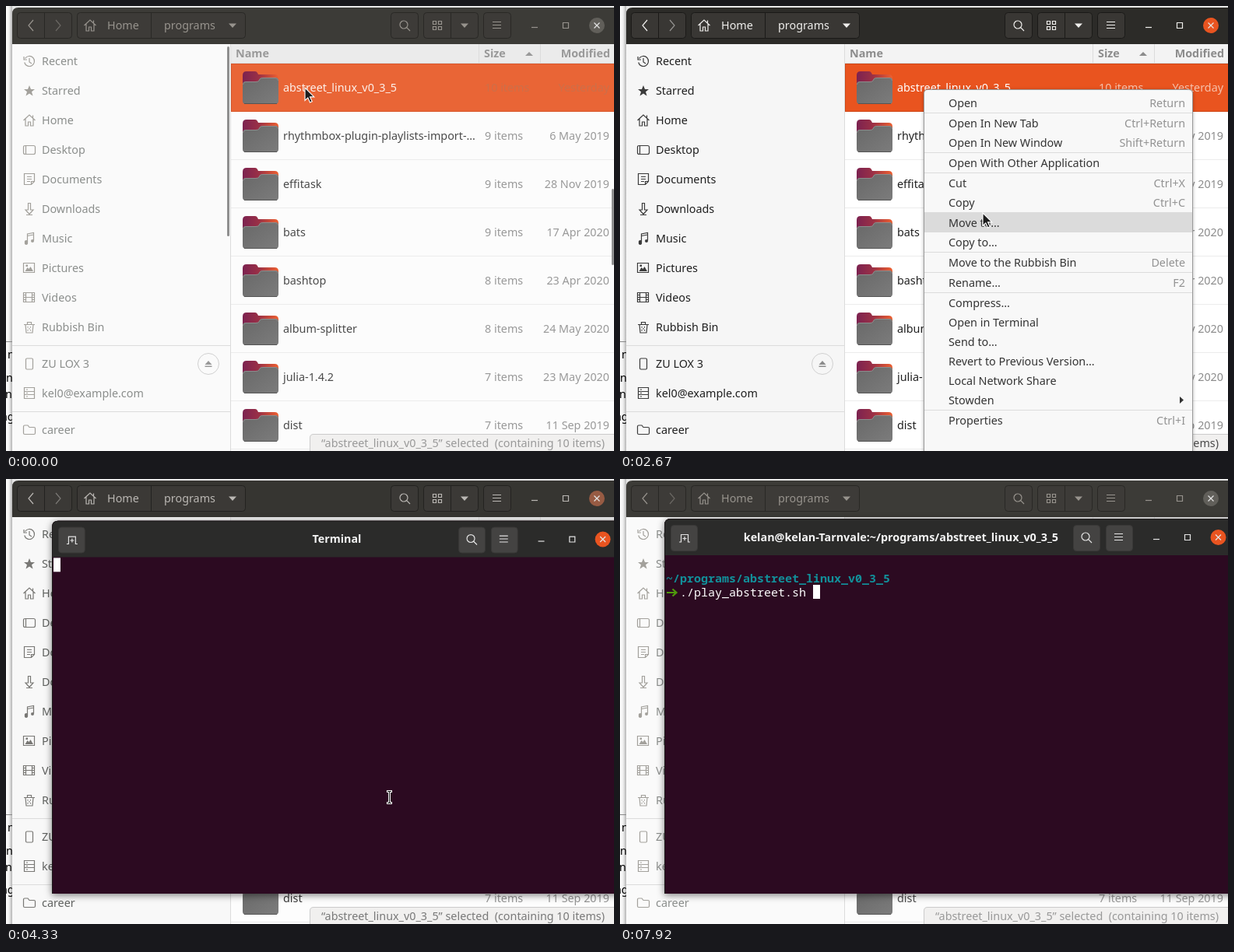
An HTML page that plays this animation: 781 px wide and 572 px high, repeating every 8000 ms.

```html
<!DOCTYPE html>
<html lang="en">
<head>
<meta charset="utf-8">
<title>Open in Terminal</title>
<style>
html, body { margin: 0; width: 781px; height: 572px; overflow: hidden; background: #fff; }
svg { display: block; }
text { font: 14.35px "Noto Sans", "Open Sans", sans-serif; white-space: pre; }
.b { font-weight: 700; }
.end { text-anchor: end; }
.mid { text-anchor: middle; }
.mono { font: 15px "Noto Sans Mono", "DejaVu Sans Mono", monospace; }
.mono.b { font-weight: 700; }
.ln { fill: none; stroke: currentColor; stroke-width: 1.2; }
.so { fill: currentColor; }
.hdr { fill: var(--hdr); }
.hbtn { fill: var(--hbtn); stroke: var(--hbord); }
.hfg { color: var(--hfg); fill: var(--hfg); }
.tfg { color: #e4e4e4; fill: #f4f4f4; }
.close { fill: var(--close); }
.side { fill: var(--side); }
.stext { fill: var(--stext); }
.sicon { color: var(--sicon); }
.list { fill: var(--list); }
.col { fill: var(--col); }
.dim { fill: var(--dim); color: var(--dim); }
.status { fill: var(--status); }
.name { fill: var(--name); }
.sel { fill: var(--sel); stroke: var(--selbord); }
.selname { fill: var(--selname); }
.selsub { fill: var(--selsub); }
.rule { stroke: #dcdcdc; }
.mtext { fill: #343434; }
.accel { fill: #929292; }
#term { transform-origin: 425px 533px; filter: drop-shadow(0 2px 5px rgba(0,0,0,.5)); }
#menu { filter: drop-shadow(0 1px 2px rgba(0,0,0,.3)); }
</style>
</head>
<body>
<svg id="stage" width="781" height="572" viewBox="0 0 781 572">
  <defs>
    <linearGradient id="edge"><stop stop-color="#fff"/><stop offset=".5" stop-color="#efefef"/><stop offset="1" stop-color="#b4b4b4"/></linearGradient>
    <linearGradient id="back"><stop stop-color="#7c2250"/><stop offset=".45" stop-color="#9a3046"/><stop offset="1" stop-color="#ee6030"/></linearGradient>
    <linearGradient id="front" x2="1" y2="1"><stop stop-color="#686868"/><stop offset="1" stop-color="#7c7c7c"/></linearGradient>
    <g id="folder">
      <path d="M0 5q0-5 5-5h11q2 0 3 2l1 2h21q5 0 5 5v20H0z" fill="url(#back)"/>
      <path d="M0 17q0-4 4-4h13q3 0 4-1.500l1-2q1-1.500 4-1.500h16q4 0 4 4v26q0 4-4 4H4q-4 0-4-4z" fill="url(#front)"/>
      <path d="M.5 17q0-3.500 3.500-3.500h13q3 0 4-1.500l1-2q1-1.500 4-1.500h16q3.500 0 3.500 3.500" stroke="#8c8c8c" fill="none"/>
      <path d="M2 41.500h42" stroke="#555" fill="none"/>
    </g>
  </defs>
  <g id="files"></g>
  <g id="menu"></g>
  <g id="term"></g>
  <path id="arrow" d="M0 0v16.500l3.800-3.600 2.700 6.100 2.700-1.200-2.700-5.900h5.300z" fill="#1c1c1c" stroke="#fff" stroke-width="1.100"/>
  <g id="beam" fill="none">
    <path d="M-3-7.500h7M.5-7.500v15M-3 7.500h7" stroke="#fff" stroke-width="3"/>
    <path d="M-2-7.500h5M.5-7.500v15M-2 7.500h5" stroke="#111"/>
  </g>
</svg>
<script>
const LOOP = 8000, STEP = 1000 / 12;
const el = id => document.getElementById(id);

const text = (x, y, s, cls = "", attrs = "") => `<text x="${x}" y="${y}" class="${cls}" ${attrs}>${s}</text>`;
const rect = (x, y, w, h, attrs = "") => `<rect x="${x}" y="${y}" width="${w}" height="${h}" ${attrs}/>`;
const line = (d, cls = "rule") => `<path d="${d}" class="${cls}" fill="none"/>`;
const at = (x, y, body, cls = "") => `<g transform="translate(${x} ${y})" class="${cls}">${body}</g>`;
const ln = d => `<path class="ln" d="${d}"/>`;
const so = d => `<path class="so" d="${d}"/>`;

// Icons are centred on the origin.
const icons = {
  recent: ln("M-5.500-3.500a6.500 6.500 0 1 1-.8 5M-7-6v4h4M0-4V1l3 2"),
  star: so("M0-7l2 5h5l-4 3.300 1.500 5.200L0 3.500l-4.500 3L-3 1.300-7-2h5z"),
  house: ln("M-7.500 0L0-7 7.500 0M-5-2v9h3.500V2h3v5H5v-9M4.500-6.500v3"),
  desktop: ln("M-5.500-5.500h11q2 0 2 2v7q0 2-2 2h-11q-2 0-2-2v-7q0-2 2-2zM-4.500-5.500v11"),
  doc: ln("M-6.500-7.500h13v10l-4 4h-9zM-3-3.500h6M-3-.5h6M-3 2.500h4M6.500 2.500h-4v4"),
  down: ln("M-1.500-7.500h3V1H5L0 6.500-5 1h3.500zM-4 7.500h8"),
  music: ln("M-2.500 4v-10l8-1.500v10M-2.500-3.500l8-1.500") + so("M-6 5a2.200 2.200 0 1 1 4 0 2.200 2.200 0 1 1-4 0M2 3a2 2 0 1 1 4 0 2 2 0 1 1-4 0"),
  picture: ln("M-7.500-6.500h14v12h-14z") + so("M-5.500 4l3-5 2 2 2-3 3.500 6zM-4.500-4.500h2.500v2.500h-2.500z"),
  film: ln("M-7.500-6.500h14v12h-14zM-4.500-6.500v12M3.500-6.500v12M-4.500-.5h8M-7.500-3.500h3M-7.500-.5h3M-7.500 2.500h3M3.500-3.500h3M3.500-.5h3M3.500 2.500h3"),
  bin: ln("M-7-3.500H7M-5-3.500l1 10.500h8l1-10.500M-2.500-3.500v-3h5v3M-2-1v1.500M1.500-1v1.500M-2 3v1.500M1.500 3v1.500M0 1v1.500"),
  phone: ln("M-3-7h6q1.500 0 1.500 1.500v11Q4.500 7 3 7h-6q-1.500 0-1.500-1.500v-11Q-4.500-7-3-7z"),
  server: ln("M-6.500-7.500h13v14h-13zM-6.500-2.500h13M-6.500 1.500h13M-4-5h2M-4-.5h2M-4 4h2"),
  folder: ln("M-7.500-4.500q0-1.500 1.500-1.500h4l2 2.500h6q1.500 0 1.500 1.500v6q0 1.500-1.500 1.500h-12q-1.500 0-1.500-1.500z"),
  search: ln("M4-1a5 5 0 1 1-10 0 5 5 0 1 1 10 0M2.700 2.700L7 7"),
  grid: ln("M-5.500-5.500h4v4h-4zM1.500-5.500h4v4h-4zM-5.500 1.500h4v4h-4zM1.500 1.500h4v4h-4z"),
  burger: ln("M-5-4.500H6M-5-.5H6M-5 3.500H6"),
  drop: so("M-5-2.500H5L0 3z"),
  min: ln("M-4 3.500h8"),
  max: ln("M-3.500-3.500h7v7h-7z"),
  close: ln("M-3.500-3.500l7 7M3.500-3.500l-7 7"),
  tab: ln("M-7 5h2.500v-9.500h9V5H7M0-2v5M-2.500.5h5")
};
const icon = (name, x, y, cls) => at(x, y, icons[name], cls);
const button = (x, y, w, attrs) => rect(x + .5, y + .5, w - 1, 33, `rx="4" ${attrs}`);

function buildFiles() {
  const places = [["recent", "Recent"], ["star", "Starred"], ["house", "Home"], ["desktop", "Desktop"],
    ["doc", "Documents"], ["down", "Downloads"], ["music", "Music"], ["picture", "Pictures"],
    ["film", "Videos"], ["bin", "Rubbish Bin"]].map(([i, s], n) => [i, s, 71 + 38 * n]);
  places.push(["phone", "ZU LOX 3", 460], ["server", "kel0@example.com", 498], ["folder", "career", 545]);
  const rows = [["abstreet_linux_v0_3_5", 10, "Yesterday"], ["rhythmbox-plugin-playlists-import-…", 9, "6 May 2019"],
    ["effitask", 9, "28 Nov 2019"], ["bats", 9, "17 Apr 2020"], ["bashtop", 8, "23 Apr 2020"],
    ["album-splitter", 8, "24 May 2020"], ["julia-1.4.2", 7, "23 May 2020"], ["dist", 7, "11 Sep 2019"]];

  let s = rect(0, 0, 781, 572, 'fill="#e6e6e6"') + rect(0, 0, 8, 572, 'fill="url(#edge)"')
    + rect(0, 431, 8, 1, 'fill="#8a8a8a"')
    + text(2, 453, "n") + text(0, 483, "n") + text(-1, 504, "no") + text(-7, 533, "ng");

  s += '<path class="hdr" d="M8 49V10q0-8 8-8h765v47z"/>';
  for (const [x, w, split] of [[14, 71, 49], [91, 217, 186], [494, 36], [536, 71, 571], [613, 36]])
    s += button(x, 8, w, 'class="hbtn"') + (split ? line(`M${split + .5} 8v34`, "hbtn") : "");
  s += at(32, 25, ln("M3-7l-6 7 6 7"), "hfg") + `<g opacity=".5">${at(67, 25, ln("M-3-7l6 7-6 7"), "hfg")}</g>`
    + icon("house", 108, 25, "hfg") + text(130, 30, "Home", "hfg") + text(203, 30, "programs", "hfg")
    + icon("drop", 291, 25, "hfg") + icon("search", 512, 25, "hfg") + icon("grid", 554, 25, "hfg")
    + icon("drop", 589, 25, "hfg") + icon("burger", 630, 25, "hfg") + icon("min", 679, 24, "hfg")
    + icon("max", 719, 25, "hfg") + '<circle cx="759" cy="25" r="10" class="close"/>'
    + icon("close", 759, 25, "tfg");

  s += rect(8, 49, 281, 523, 'class="side"') + line("M288.500 49v523M8 436.500h280M8 521.500h280");
  for (const [i, label, y] of places) s += icon(i, 30, y, "sicon") + text(46, y + 5, label, "stext");
  s += at(260, 460, '<circle r="13.500" fill="none" stroke="#d0d0d0"/>' + so("M-4.500 1L0-4 4.500 1zM-4.500 2.500h9v1.500h-9z"), "dim");

  s += rect(289, 49, 492, 523, 'class="list"') + rect(289, 49, 492, 24, 'class="col"')
    + line("M289 73.500h492M607.500 49v24M686.500 49v24")
    + text(295, 66, "Name", "b dim") + text(614, 66, "Size", "b dim") + text(776, 66, "Modified", "b dim end")
    + '<path class="dim" d="M667 64h10l-5-5z"/>' + rect(289.5, 74.5, 493, 61, 'class="sel"');
  rows.forEach(([name, count, date], n) => {
    const y = 110 + 62 * n, sub = n ? "dim" : "selsub";
    s += `<use href="#folder" x="304" y="${84 + 62 * n}"/>` + text(356, y, name, n ? "name" : "selname")
      + text(615, y, count + " items", sub) + text(775, y, date, sub + " end");
    if (n) s += `<path d="M289 ${135.5 + 62 * n}h492" stroke="#ececec"/>`;
  });
  s += `<path d="M390.500 573v-18q0-4.500 4.500-4.500h387v23z" fill="#f1f0ef" stroke="#cbcbcb"/>`
    + text(769, 567, "“abstreet_linux_v0_3_5” selected  (containing 10 items)", "status end")
    + `<g id="bars" fill="#8f8f8f">${rect(284, 52, 3, 244, 'rx="1.500"')}${rect(778, 235, 3, 98, 'rx="1.500"')}</g>`;
  el("files").innerHTML = s;
}

const itemTops = [];
function buildMenu() {
  const groups = ["Open|Return", "Open In New Tab|Ctrl+Return,Open In New Window|Shift+Return",
    "Open With Other Application", "Cut|Ctrl+X,Copy|Ctrl+C", "Move to…,Copy to…",
    "Move to the Rubbish Bin|Delete", "Rename…|F2",
    "Compress…,Open in Terminal,Send to…,Revert to Previous Version…,Local Network Share,Stowden",
    "Properties|Ctrl+I"];
  let y = 112, labels = "";
  groups.forEach((group, g) => {
    if (g) labels += line(`M391 ${y++ + .5}h344`);
    for (const item of group.split(",")) {
      const [label, key = ""] = item.split("|");
      itemTops.push(y);
      labels += text(422, y + 18, label, "mtext") + text(726, y + 18, key, "accel end");
      if (label === "Stowden") labels += `<path d="M719 ${y + 8}v9l5-4.500z" fill="#333"/>`;
      y += 25;
    }
  });
  el("menu").innerHTML = '<path d="M390.500 580V112.500q0-5 5-5h335q5 0 5 5V580z" fill="#f8f8f8" stroke="#9a9a9a"/>'
    + rect(391, 112, 344, 25, 'id="hover" fill="#dbdbdb"') + labels;
}

function buildTerminal() {
  const btn = x => button(x, 59, 35, 'fill="#444342" stroke="#3a3938"');
  el("term").innerHTML = '<path d="M57 533V59q0-8 8-8h728v482z" fill="#2c0a21"/>'
    + '<path d="M57 98V59q0-8 8-8h728v47z" fill="#2b2b2a"/><path d="M57.500 533V59q0-7.500 7.500-7.500h728" fill="none" stroke="#1d1a1b"/>'
    + btn(65) + btn(582) + btn(624) + icon("tab", 83, 76, "tfg") + icon("search", 599, 75, "tfg")
    + icon("burger", 640, 75, "tfg") + icon("min", 689, 74, "tfg") + icon("max", 729, 75, "tfg")
    + '<circle cx="768.500" cy="75" r="10" fill="#e95420"/>' + icon("close", 768.5, 75, "tfg")
    + text(425, 80, "Terminal", "b mid tfg", 'id="short"')
    + text(563, 80, "kelan@kelan-Tarnvale:~/programs/abstreet_linux_v0_3_5", "b end tfg", 'id="long"')
    + `<g id="prompt">${text(59, 133, "~/programs/abstreet_linux_v0_3_5", "mono b", 'fill="#12909a"')}`
    + '<path d="M60 146h11M67.500 141.500l5 4.500-5 4.500" fill="none" stroke="#4f9a0c" stroke-width="2.200"/></g>'
    + text(77, 151, "", "mono", 'id="typed" fill="#fff"')
    + rect(77, 136, 9, 18, 'id="caret" fill="#fff"');
}

// Colours for the unfocused and the focused file window.
const theme = {
  hdr: ["#3c3b37", "#2c2b28"], hbtn: ["#3d3b38", "#393734"], hbord: ["#292825", "#1b1a18"],
  hfg: ["#97938d", "#efeeec"], close: ["#615f5a", "#e95420"], side: ["#fafafa", "#f6f6f6"],
  stext: ["#8b8e8c", "#1f1f1f"], sicon: ["#a3a19c", "#3b3b3b"], list: ["#fcfcfc", "#ffffff"],
  col: ["#ebebeb", "#f3f3f3"], dim: ["#999999", "#8c8c8c"], name: ["#4a4a4a", "#202020"],
  status: ["#999999", "#4a4a4a"], sel: ["#e96536", "#e9541f"], selbord: ["#d9572a", "#cf4716"],
  selname: ["#fdf0ea", "#ffffff"], selsub: ["#cd6f49", "#f6c0aa"]
};
const rgb = hex => [1, 3, 5].map(i => parseInt(hex.slice(i, i + 2), 16));
function setFocus(a) {
  for (const key in theme) {
    const [from, to] = theme[key].map(rgb);
    const c = from.map((v, i) => Math.round(v + (to[i] - v) * a));
    document.documentElement.style.setProperty("--" + key, `rgb(${c})`);
  }
}

// Pointer waypoints: step, x, y.
const route = [[0, 384, 105], [1, 384, 105], [2, 390, 106], [12, 390, 106], [16, 428, 146], [17, 428, 146],
  [20, 441, 163], [24, 441, 163], [25, 445, 163], [26, 445, 163], [32, 466, 266], [33, 468, 275], [34, 468, 275],
  [40, 476, 317], [41, 476, 317], [44, 487, 389], [45, 487, 389], [48, 492, 408], [50, 492, 408], [52, 492, 409],
  [58, 446, 318], [59, 446, 318], [60, 442, 313]];
// Typing: step, text, caret shown.
const typing = [[51, "", 1], [58, "", 0], [65, "", 1], [73, "", 0], [74, ".", 1], [79, "./", 1], [85, "./", 0],
  [86, "./p", 1], [88, "./pl", 1], [95, "./play_abstreet.sh ", 1]];

function pointer(n) {
  const i = route.findIndex(p => p[0] > n);
  if (i < 0) return route.at(-1).slice(1);
  const [a, x, y] = route[i - 1], [b, u, v] = route[i], k = (n - a) / (b - a);
  return [Math.round(x + (u - x) * k), Math.round(y + (v - y) * k)];
}
const clamp = v => Math.min(1, Math.max(0, v));
const show = (id, on) => { el(id).style.display = on ? "" : "none"; };

function draw(n) {
  const [x, y] = pointer(n);
  setFocus(Math.min(clamp((n - 5) / 3), clamp((53.2 - n) / 3)));
  el("bars").style.opacity = clamp((16 - n) / 7) ** 2.5;

  const menuOpen = n >= 6 && n < 51;
  show("menu", menuOpen);
  if (menuOpen) el("hover").setAttribute("y", itemTops.filter(top => top <= Math.max(y, 112)).at(-1));

  const open = n >= 51, ready = n >= 57;
  show("term", open);
  show("arrow", !open);
  show("beam", open && n < 74);
  el(open ? "beam" : "arrow").setAttribute("transform", `translate(${x} ${y})`);
  if (!open) return;

  const [scale, opacity] = [[.97, .5], [.9945, 1]][n - 51] || [1, 1];
  el("term").style.transform = `scale(${scale})`;
  el("term").style.opacity = opacity;
  show("short", !ready);
  show("long", ready);
  show("prompt", ready);
  const [, typed, caret] = typing.filter(k => k[0] <= n).at(-1);
  el("typed").textContent = typed;
  show("caret", caret);
  el("caret").setAttribute("x", (ready ? 77 : 59) + 9 * typed.length);
  el("caret").setAttribute("y", ready ? 136 : 99);
}

buildFiles();
buildMenu();
buildTerminal();
const start = performance.now();
let shown = -1;
function tick() {
  const t = (performance.now() - start) % LOOP;
  const n = Math.min(95, Math.floor((t + 5) / STEP));
  if (n !== shown) draw(shown = n);
  requestAnimationFrame(tick);
}
tick();
</script>
</body>
</html>
```
